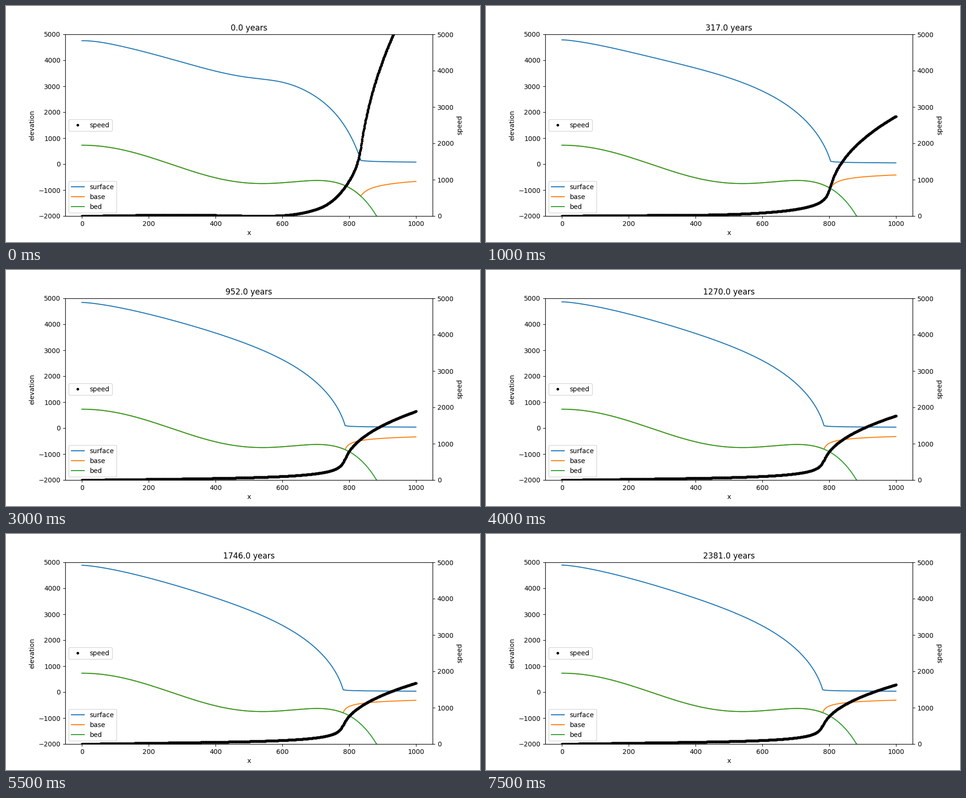
Write a matplotlib script that moves like this. It is 1000 by 500 pixels and loops after 8000 ms.

```python
import numpy as np
import matplotlib.pyplot as plt
from matplotlib.animation import FuncAnimation

FRAMES, INTERVAL = 16, 500
YEARS = 10000 / 63      # model time between frames
SUBSTEPS = 40
LENGTH = 1000           # domain in plot units
UNIT = 1800             # metres per plot unit
ACCUM = 0.3             # snowfall, m/yr
FLOAT = 0.8955          # ice to water density ratio
DRAG = 4900             # basal friction over driving stress
CREEP = 0.8             # keeps the flow law linear at low stress
POWER = 7 / 3           # thickness**POWER is nearly linear at the margin
CELLS = 200
REF_H, REF_U = 881, 493  # thickness and speed at the final grounding line


def bed(x):
    r = (x * UNIT / 750e3) ** 2
    return 729 - 2184.8 * r + 1031.72 * r**2 - 151.72 * r**3


def grounding(t):
    """Retreat of the grounding line, t in frames."""
    return 780 + 38.5 * np.exp(-0.26 * t) + 16.5 * np.exp(-1.17 * t)


def flotation(ground):
    return -bed(ground) / FLOAT


def spline(x, y, q):
    """Natural cubic spline."""
    n, h = len(x), np.diff(x)
    d = np.diff(y) / h
    a, b = np.eye(n), np.zeros(n)
    for i in range(1, n - 1):
        a[i, i - 1:i + 2] = h[i - 1], 2 * (h[i - 1] + h[i]), h[i]
        b[i] = 6 * (d[i] - d[i - 1])
    m = np.linalg.solve(a, b)
    k = np.clip(np.searchsorted(x, q) - 1, 0, n - 2)
    s, r = q - x[k], x[k + 1] - q
    return ((m[k] * r**3 + m[k + 1] * s**3) / (6 * h[k])
            + (y[k] / h[k] - m[k] * h[k] / 6) * r
            + (y[k + 1] / h[k] - m[k + 1] * h[k] / 6) * s)


def initial(x):
    """Starting thickness, mirrored at the divide."""
    known = np.array([4026, 3984, 4003, 4075, 4109, 4067, 3873, 3230])
    h = np.concatenate([known[2:0:-1], known, [flotation(x[-1])]])
    at = np.append(np.arange(-200, 701, 100), x[-1])
    return spline(at, h**POWER, x) ** (1 / POWER)


def flow(x, h):
    """Speed, flux and flux sensitivity between the nodes."""
    mid = (h[1:] + h[:-1]) / 2
    stress = -mid * np.diff(bed(x) + h) / x[1] / DRAG
    u = stress**3 + CREEP * stress
    return u, mid * u, mid**2 / DRAG * (3 * stress**2 + CREEP) / x[1]


EYE = np.eye(CELLS + 1)
DROP = EYE[:-1] - EYE[1:]


def advance(x, h, dt):
    """One linearised implicit step of mass conservation."""
    _, q, dq = flow(x, h)
    cell = np.full(CELLS + 1, UNIT * x[1])
    cell[0] /= 2
    rate = ACCUM - DROP.T @ q / cell
    jac = DROP.T @ (dq[:, None] * DROP) / cell[:, None]
    rate[-1], jac[-1] = 0, 0
    return h + np.linalg.solve(EYE + dt * jac, dt * rate)


def whole(x, h):
    """Join the grounded ice to its floating shelf: x, thickness, speed."""
    ground, edge = x[-1], h[-1]
    u_edge = REF_U * (edge / REF_H) ** 3
    xm = (x[1:] + x[:-1]) / 2
    u, _, _ = flow(x, h)
    u = u + (u_edge - u[-1]) * np.exp((xm - ground) / 10)

    xg = np.linspace(0, ground, 801)
    hg = np.interp(xg, x, h**POWER) ** (1 / POWER)
    ug = np.interp(xg, np.concatenate([[0], xm, [ground]]),
                   np.cbrt(np.concatenate([[0], u, [u_edge]]))) ** 3

    # the shelf thins and speeds up as it spreads
    xs = np.linspace(ground, LENGTH, 301)[1:]
    thin = 3.14e-13 * (REF_H / edge) ** 6.4
    hs = (edge**-4 + thin * (xs - ground)) ** -0.25
    us = u_edge + 3.9e-6 * (hs**-1.7 - edge**-1.7) / (0.425 * thin)
    return (np.concatenate([xg, xs]), np.concatenate([hg, hs]),
            np.concatenate([ug, us]))


def simulate():
    x = np.linspace(0, grounding(0), CELLS + 1)
    h = initial(x)
    states = [whole(x, h)]
    for i in range(1, FRAMES):
        for k in range(1, SUBSTEPS + 1):
            new = np.linspace(0, grounding(i - 1 + k / SUBSTEPS), CELLS + 1)
            h = h + np.gradient(h, x) * (new - x)
            x = new
            h[-1] = flotation(x[-1])
            h = advance(x, h, YEARS / SUBSTEPS)
        states.append(whole(x, h))
    return states


states = simulate()

fig, ax = plt.subplots(figsize=(10, 5), dpi=100)
ax2 = ax.twinx()
grid = np.linspace(0, LENGTH, 1001)
surface, = ax.plot([], [], label="surface")
base, = ax.plot([], [], label="base")
ax.plot(grid, bed(grid), label="bed")
speed, = ax2.plot([], [], "k.", label="speed")

ax.set_xlim(-50, 1050)
ax.set_ylim(-2000, 5000)
ax2.set_ylim(0, 5000)
ax.set_xlabel("x")
ax.set_ylabel("elevation", labelpad=4.7)
ax2.set_ylabel("speed")
ax.legend(loc="lower left")
ax2.legend(loc="center left")
title = ax.set_title("0.0 years")


def update(i):
    x, h, u = states[i]
    bottom = np.maximum(bed(x), -FLOAT * h)
    surface.set_data(x, bottom + h)
    base.set_data(x, bottom)
    speed.set_data(grid, np.interp(grid, x, u))
    title.set_text(f"{round(i * YEARS)}.0 years")
    return surface, base, speed, title


anim = FuncAnimation(fig, update, frames=FRAMES, interval=INTERVAL,
                     repeat=True, repeat_delay=0)
plt.show()
```
